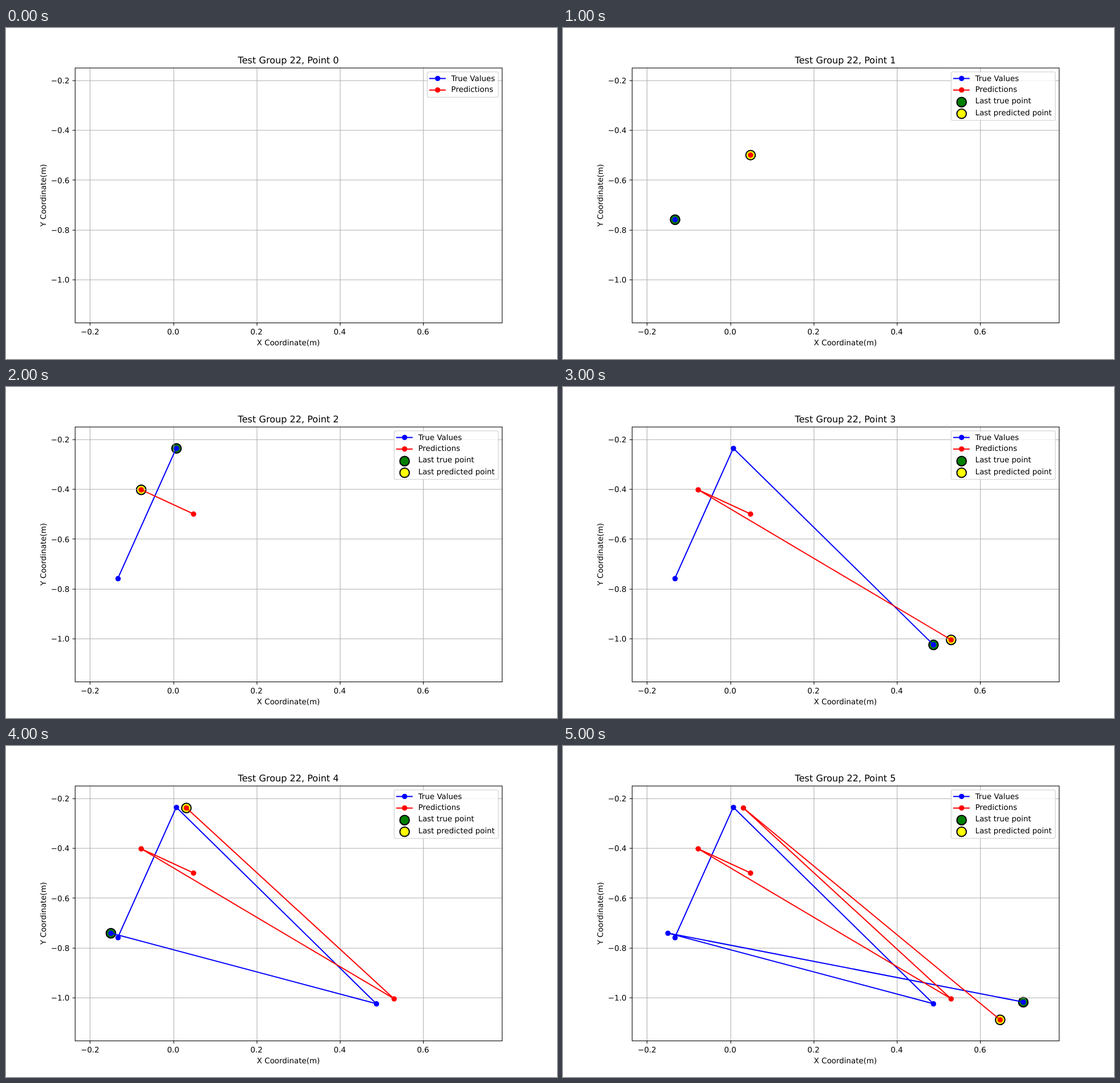
These frames come from a looping animation (966 by 580 pixels, 6 s). An HTML page:

```html
<!DOCTYPE html>
<html lang="en">
<head>
<meta charset="utf-8">
<title>Point tracking plot</title>
<style>
  html, body { margin: 0; width: 100%; height: 100%; overflow: hidden; background: #fff; }
  svg { display: block; width: 966px; height: 580px; }
  text { font: 13.89px "DejaVu Sans", sans-serif; text-rendering: geometricPrecision; }
  .title { font-size: 16.67px; }
  .mid { text-anchor: middle; }
  .end { text-anchor: end; }
</style>
</head>
<body>
<svg viewBox="0 0 1000 600" preserveAspectRatio="none">
  <g id="halos"></g>
  <g id="axes"></g>
  <g id="lines"></g>
  <rect x="125.5" y="72.5" width="775" height="462" fill="none" stroke="#000" stroke-width="1.11"/>
  <text class="mid" x="512.5" y="575">X Coordinate(m)</text>
  <text class="mid" transform="translate(72.5 303.3) rotate(-90)">Y Coordinate(m)</text>
  <text class="mid title" id="title" x="512.5" y="64"></text>
  <g id="legend"></g>
</svg>
<script>
const STEP = 1000;
const STEPS = 6;
const LINE = 2.083;
const ROW = 20.94;
const box = { left: 125.5, right: 900.5, top: 72.5, bottom: 534.5 };
const series = [
  { color: "#00f", halo: "#008000", name: "True Values", last: "Last true point",
    points: [[203, 347], [309, 111], [672, 467], [190, 339], [835, 464]] },
  { color: "#f00", halo: "#ff0", name: "Predictions", last: "Last predicted point",
    points: [[340, 230], [245, 186], [704, 458], [327, 112], [793, 496]] }
];

const fill = (id, html) => { document.getElementById(id).innerHTML = html; };
const snap = v => Math.round(v) + 0.5;
// Markers sit on whole pixels, a little right of and below the line vertices.
const marker = v => Math.round(v) + 0.4;
const path = (d, color, width) =>
  `<path d="${d}" fill="none" stroke="${color}" stroke-width="${width}" stroke-linejoin="round" stroke-linecap="square"/>`;
const dot = ([x, y], color) =>
  `<circle cx="${marker(x)}" cy="${marker(y)}" r="4.86" fill="${color}"/>`;
const halo = ([x, y], color) =>
  `<circle cx="${marker(x)}" cy="${marker(y)}" r="8.6" fill="${color}" stroke="#000" stroke-width="${LINE}"/>`;
const label = (x, y, text, cls = "") =>
  `<text class="${cls}" x="${x}" y="${Math.round(y)}">${text}</text>`;
const tickName = value => value.toFixed(1).replace("-", "\u2212");

function drawAxes() {
  let grid = "", ticks = "", labels = "";
  for (let i = 0; i < 5; i++) {
    const x = 152.45 + 151.1 * i;
    const y = 94.9 + 90.2 * i;
    grid += `M${snap(x)} ${box.top}V${box.bottom}M${box.left} ${snap(y)}H${box.right}`;
    ticks += `M${snap(x)} ${box.bottom}v4.3M${box.left} ${snap(y)}h-4.3`;
    labels += label(x, 555, tickName((i - 1) / 5), "mid")
            + label(115.2, y + 5.3, tickName(-(i + 1) / 5), "end");
  }
  fill("axes", path(grid, "#b0b0b0", 1.11) + path(ticks, "#000", 1.11) + labels);
}

function drawLegend(full) {
  const left = full ? 703.7 : 763.7;
  const mid = left + 19.4;
  const rowLabel = (row, text) => label(left + 44.4, 95.5 + ROW * row, text);
  let html = `<rect x="${snap(left)}" y="79.5" width="${893.5 - snap(left)}" height="${full ? 88 : 46}" rx="2.8"
    fill="#fff" stroke="#ccc" stroke-width="1.39" opacity=".8"/>`;
  series.forEach((s, i) => {
    const y = 90.64 + ROW * i;
    html += path(`M${mid - 13.9} ${snap(y)}h27.8`, s.color, LINE) + dot([mid, y], s.color)
          + rowLabel(i, s.name);
    if (full) html += halo([mid, 91.85 + ROW * (i + 2)], s.halo) + rowLabel(i + 2, s.last);
  });
  fill("legend", html);
}

function draw(count) {
  fill("title", `Test Group 22, Point ${count}`);
  fill("halos", count ? series.map(s => halo(s.points[count - 1], s.halo)).join("") : "");
  fill("lines", series.map(s => {
    const shown = s.points.slice(0, count);
    const trail = count > 1 ? path("M" + shown.join("L"), s.color, LINE) : "";
    return trail + shown.map(p => dot(p, s.color)).join("");
  }).join(""));
  drawLegend(count > 0);
}

const start = performance.now();
let current = 0;

function tick() {
  const count = Math.floor((performance.now() - start) / STEP) % STEPS;
  if (count !== current) draw(current = count);
  requestAnimationFrame(tick);
}

drawAxes();
draw(current);
requestAnimationFrame(tick);
</script>
</body>
</html>
```
